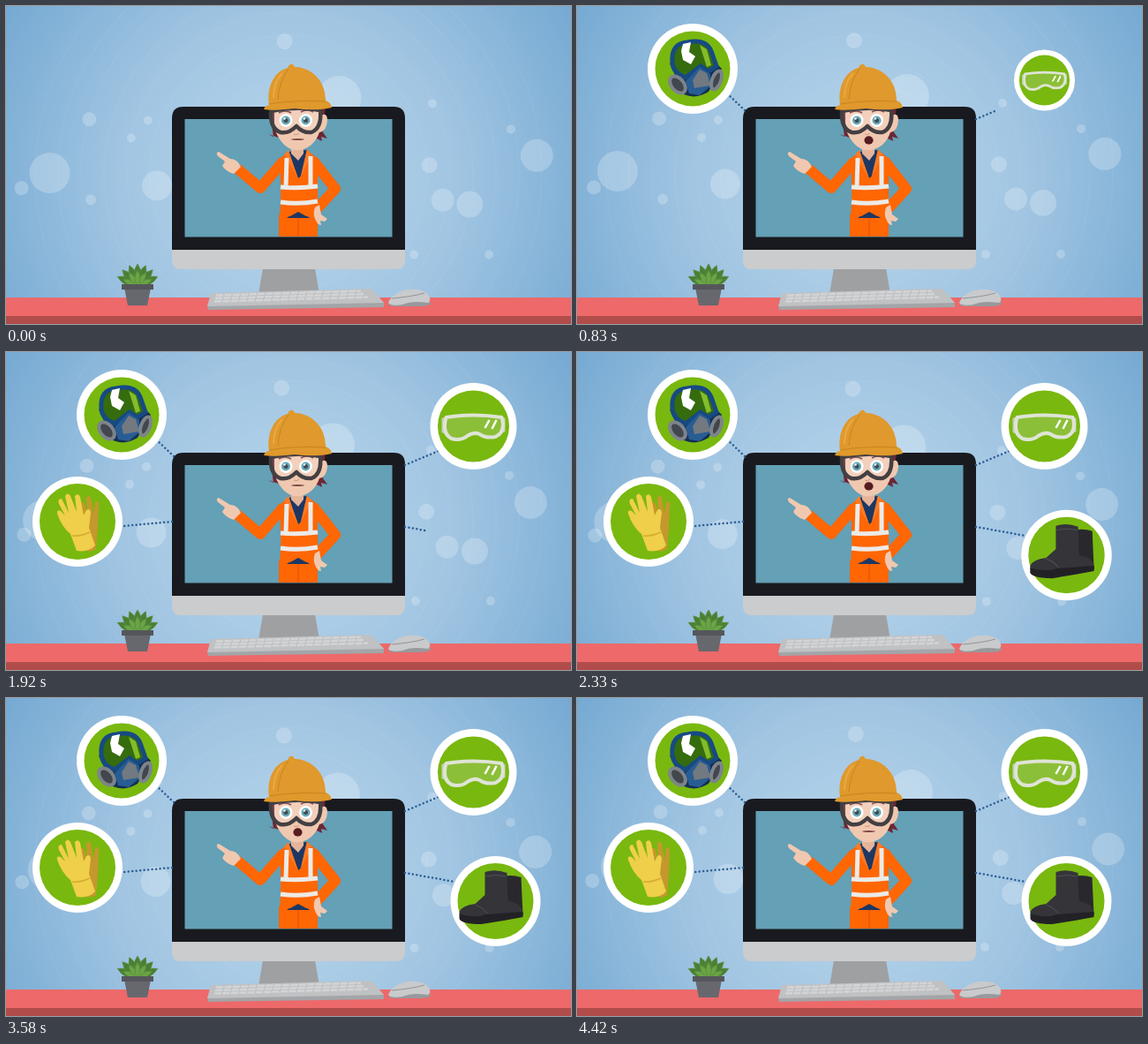
Recreate the animation shown at these times as an HTML page. Size 640 by 360 pixels, loop 4.51 s.

```html
<!DOCTYPE html>
<html lang="en">
<head>
<meta charset="utf-8">
<title>Safety equipment</title>
<style>
html, body { margin: 0; width: 100%; height: 100%; overflow: hidden; background: #9cc4e1; }
svg { display: block; width: 100vw; height: 100vh; }
.line { stroke: #2b5d92; stroke-width: 2.5; stroke-linecap: round; stroke-dasharray: 0 4.5; }
.arm { fill: none; stroke: #ff6604; stroke-width: 12; stroke-linejoin: round; }
.tape { fill: none; stroke: #eceae6; stroke-width: 5; }
.suit { fill: #ff6604; }
.skin { fill: #f0c8b0; }
.navy { fill: #1d3763; }
</style>
</head>
<body>
<svg viewBox="0 0 640 360">
<defs>
  <radialGradient id="sky" gradientUnits="userSpaceOnUse" cx="320" cy="200" r="380">
    <stop offset="0" stop-color="#b9d7ec"/>
    <stop offset=".5" stop-color="#a1c5e2"/>
    <stop offset="1" stop-color="#75a9d2"/>
  </radialGradient>
</defs>
<rect width="640" height="360" fill="url(#sky)"/>
<g id="rings" fill="none" stroke="#fff" stroke-opacity=".035" stroke-width="2"></g>
<g id="bubbles" fill="#fff" fill-opacity=".23"></g>

<!-- desk -->
<path fill="#ed696a" d="M0 330H640V351H0Z"/>
<path fill="#b04d4b" d="M0 351H640V360H0Z"/>

<!-- computer -->
<path fill="#9fa0a2" d="M291 297H350L355 326H286Z"/>
<path fill="#191a1f" d="M188 277V127Q188 114 201 114H439Q452 114 452 127V277Z"/>
<path fill="#cbcccd" d="M188 276H452V288Q452 298 442 298H198Q188 298 188 288Z"/>
<rect x="202.500" y="128" width="235" height="133.500" fill="#64a0b6"/>

<!-- keyboard and mouse -->
<path fill="#a3a5a8" d="M228 338L428 335V341L229 344Z"/>
<path fill="#bfc1c3" d="M232 325L410 320Q414 320 416 322L428 336L228 340Z"/>
<path stroke="#d3d4d6" stroke-width="2.500" stroke-dasharray="8 1.4" d="M238 327.500L402 322.500M237 331L406 326M236 334.500L410 329.500"/>
<path fill="#98999c" d="M433 335H481V337Q478 340 470 340H437Q433 339 433 335Z"/>
<path fill="#c9cacc" d="M433 336Q437 325 455 321Q473 319 479 328Q482 333 478 336Q460 333 449 338Q436 340 433 336Z"/>
<path fill="none" stroke="#939497" d="M437 331Q460 329 474 325"/>

<!-- plant -->
<g id="leaves"></g>
<path fill="#67686e" d="M134 319H164L160 339H138Z"/>
<path fill="#55565c" d="M131 315H167V321H131Z"/>

<!-- presenter -->
<path class="arm" d="M314 176L288 206L262 184"/>
<path class="arm" d="M348 175L373 207L352 230"/>
<path class="skin" d="M266 182L258 190Q250 188 245 181L248 176L240 170Q237 166 241 165L254 173Q262 173 266 182Z"/>
<path class="suit" d="M309 236H353V261H309Z"/>
<path fill="none" stroke="#d9530c" d="M331 240V261"/>
<path class="navy" d="M318 240L331 231L344 240Z"/>
<path class="suit" d="M318 167L309 173Q313 205 310 238H322L331 233L340 238H354Q352 205 354 173L343 165Z"/>
<path class="navy" d="M320 165L341 163L335 192L331 195Z"/>
<path fill="#e5b499" d="M323 155H337V167L331 175L323 167Z"/>
<path fill="#ff7a24" d="M320 163L315 168L331 196ZM341 162L346 168L333 196Z"/>
<path class="tape" d="M318 172L317 205M345 170V204M311 205Q331 207 353 204M311 222Q331 225 353 221"/>
<path class="skin" d="M350 228L355 225L357 236L364 241L361 244L356 243L357 248Q353 248 351 243Q347 236 350 228Z"/>
<path fill="#6c2735" d="M298 112L303 148L297 145L312 150V112ZM348 112H362L359 143L364 150L357 148L358 153L348 148Z"/>
<path class="skin" d="M304 110H357V124Q364 120 364 130Q363 142 355 143Q349 160 333 163Q323 165 314 156Q304 145 304 132Z"/>
<g id="eyes"></g>
<path fill="none" stroke="#70303a" stroke-width="1.500" d="M309 121Q316 117 323 121M334 120Q341 116 348 120"/>
<path fill="#fff" fill-opacity=".15" stroke="#433f42" stroke-width="4.500" stroke-linejoin="round" d="M300 119Q328 113 356 118Q358 138 346 143Q336 144 329 136Q320 145 311 143Q299 139 300 119Z"/>
<path fill="none" stroke="#cf967c" d="M326 145Q329 147 332 144"/>
<ellipse id="mouth" cx="330.500" fill="#571c20"/>
<path fill="#df992c" d="M298 112C295 91 304 74 319 70Q321 65 325 66L327 69C349 70 362 87 362 107Q368 109 369 115Q352 119 327 116Q300 119 292 117Q293 113 298 112Z"/>
<path fill="none" stroke="#c8851f" d="M298 111Q328 106 362 108M320 71Q309 86 308 106"/>
<path fill="none" stroke="#e9a941" stroke-width="2" d="M313 76Q303 86 303 104"/>

<!-- callouts: line first, then the badge -->
<g id="callouts">
  <line class="line"/>
  <g>
    <circle r="51" fill="#fff"/><circle r="42.500" fill="#79b80f"/>
    <path fill="#152f52" d="M-26 -6L-10 29Q4 35 18 26L33 0L25 -8Z"/>
    <path fill="#356c0e" stroke="#174a83" stroke-width="5" d="M-23 -6Q-25 -29 -6 -30Q15 -34 21 -20L27 -3L18 3L9 -3L-8 10Q-21 6 -23 -6Z"/>
    <path fill="#83bd2b" d="M8 -27L16 -22L21 -4L16 -2Z"/>
    <path fill="#fff" d="M-11 -28L-2 -30L-4 -19L3 -14L-2 -5L-11 -10L-13 -20Z"/>
    <path fill="#285d93" d="M-8 14L8 -2L20 6V20L8 30L-4 28Z"/>
    <path fill="#737980" d="M8 1L16 5L20 19L2 22L0 13Z"/>
    <g fill="#42474d" stroke="#7d848b" stroke-width="4">
      <ellipse cx="-17" cy="18" rx="7" ry="11" transform="rotate(-40 -17 18)"/>
      <ellipse cx="27" cy="13" rx="5" ry="11" transform="rotate(20 27 13)"/>
    </g>
  </g>
  <line class="line"/>
  <g>
    <circle r="49" fill="#fff"/><circle r="40.500" fill="#79b80f"/>
    <path fill="#c6cebb" d="M-36 -9L-30 -11V10L-36 7ZM30 -11L36 -9V6L30 9Z"/>
    <path fill="#8cbf38" stroke="#dfe4d6" stroke-width="4" stroke-linejoin="round" d="M-31 -10Q0 -15 32 -10Q37 6 25 12Q14 14 7 9Q0 6 -7 11Q-14 17 -25 14Q-36 8 -31 -10Z"/>
    <path stroke="#fff" stroke-width="2.500" d="M18 -7L13 2M26 -7L21 3"/>
  </g>
  <line class="line"/>
  <g>
    <circle r="51" fill="#fff"/><circle r="43" fill="#79b80f"/>
    <path fill="#c4982d" d="M3 -20Q6 -24 8 -20L11 -7L10 -27Q13 -32 15 -27L18 -9L20 -22Q23 -25 24 -20L23 8L21 31Q13 36 7 31Z"/>
    <path fill="#f0cf4a" d="M-21 -20Q-23 -26 -18 -26L-10 -10L-14 -29Q-11 -34 -8 -29L-1 -11L-3 -29Q1 -33 3 -28L7 -7L10 -13Q14 -16 15 -10L13 7L20 27Q13 35 -1 33L-8 14Q-18 6 -23 -9Q-24 -14 -19 -12L-14 -7Z"/>
    <path fill="none" stroke="#d5ac32" stroke-width="1.500" d="M-6 16Q3 17 14 12"/>
  </g>
  <line class="line"/>
  <g>
    <circle r="51" fill="#fff"/><circle r="43" fill="#79b80f"/>
    <path fill="#29292d" d="M4 -27Q17 -31 29 -27L31 16L8 22Z"/>
    <path fill="#343439" d="M-12 -33Q0 -37 13 -32L14 0Q31 2 31 15L6 20L-22 24Q-41 23 -41 12Q-38 5 -23 3L-12 -7Z"/>
    <path fill="#222226" d="M-41 14Q-23 20 -11 15L31 12V18L9 22L-16 26Q-38 26 -41 20Z"/>
    <path fill="none" stroke="#505057" d="M-11 -28Q0 -31 12 -28M-23 4Q-14 7 -9 14"/>
  </g>
</g>
</svg>
<script>
const LOOP = 4510, STEP = 83.52;
const $ = id => document.getElementById(id);
const add = (parent, tag, attrs) => {
  const el = document.createElementNS("http://www.w3.org/2000/svg", tag);
  set(el, attrs);
  return parent.appendChild(el);
};
function set(el, attrs) {
  for (const k in attrs) el.setAttribute(k, attrs[k]);
}

for (let r = 105; r < 290; r += 26)
  add($("rings"), "circle", { cx: 320, cy: 190, r });

for (const cx of [317, 339.5]) {
  const disc = (r, fill, dx = 0, dy = 0) =>
    add($("eyes"), "circle", { cx: cx + dx, cy: 129.5 + dy, r, fill });
  disc(7.5, "#fff");
  disc(5, "#4b98a8");
  disc(2.5, "#202a35");
  disc(1.2, "#fff", -1.5, -2);
}

// two fans of leaves, each laid from the outside in
[[7, 25, "#4b7f35"], [5, 18, "#6aa446"]].forEach(([count, len, fill]) => {
  for (let i = 0; i < count; i++) {
    const turn = (i % 2 ? 1 : -1) * 65 * (1 - (i >> 1) * 2 / (count - 1));
    add($("leaves"), "path", {
      d: `M0 0Q${-len / 3} ${-len / 2} 0 ${-len}Q${len / 3} ${-len / 2} 0 0`,
      fill, stroke: "#568d3b", "stroke-width": .8,
      transform: `translate(149 317) rotate(${turn})`
    });
  }
});

// centre and radius; drift grows with size, low bubbles drift clockwise
const bubbles = [
  [314, 41, 9], [93, 129, 8], [160, 130, 5], [141, 150, 5], [46, 191, 23], [19, 207, 8],
  [97, 220, 6], [168, 205, 17], [374, 106, 25], [482, 111, 5], [571, 140, 5],
  [598, 171, 18.5], [478, 181, 9], [497, 221, 13], [528, 226, 15], [548, 282, 5], [463, 282, 5]
].map(([x, y, r]) => ({
  x, y, drift: Math.min(4, r / 5), spin: y > 205 ? -1 : 1,
  el: add($("bubbles"), "circle", { r })
}));

// badge centre, then the line from the screen to the badge
const parts = [...$("callouts").children];
const callouts = [
  { start: 100, at: [131, 71], from: [190, 118], to: [171, 100] },
  { start: 580, at: [529.5, 84], from: [452, 128], to: [490, 112] },
  { start: 1080, at: [81, 192], from: [188, 192], to: [133, 197] },
  { start: 1760, at: [554.5, 230], from: [452, 198], to: [508, 208] }
];

const clamp = v => Math.min(1, Math.max(0, v));
const mix = (a, b, p) => a + (b - a) * p;
const backOut = p => 1 + 2.6 * (p - 1) ** 3 + 1.6 * (p - 1) ** 2;
const shown = p => p ? "visible" : "hidden";

function draw(step) {
  const t = step * STEP;
  const angle = (28 + .075 * t) * Math.PI / 180;
  for (const { x, y, drift, spin, el } of bubbles)
    set(el, { cx: x + spin * drift * Math.cos(angle), cy: y - drift * Math.sin(angle) });

  callouts.forEach(({ start, at, from, to }, i) => {
    const grow = clamp((t - start) / 400), pop = clamp((t - start - 165) / 440);
    set(parts[2 * i], {
      x1: from[0], y1: from[1],
      x2: mix(from[0], to[0], grow), y2: mix(from[1], to[1], grow),
      visibility: shown(grow)
    });
    set(parts[2 * i + 1], {
      transform: `translate(${at}) scale(${backOut(pop)})`,
      visibility: shown(pop)
    });
  });

  // closed, half open or open
  const open = Math.round(1 - Math.cos(2.143 * step));
  set($("mouth"), { rx: 7.5 - 1.2 * open, ry: .7 + 2 * open, cy: 151 + open / 2 });
}

// the picture advances twelve times a second
function tick() {
  draw(Math.floor(performance.now() % LOOP / STEP + .15));
  requestAnimationFrame(tick);
}
tick();
</script>
</body>
</html>
```
